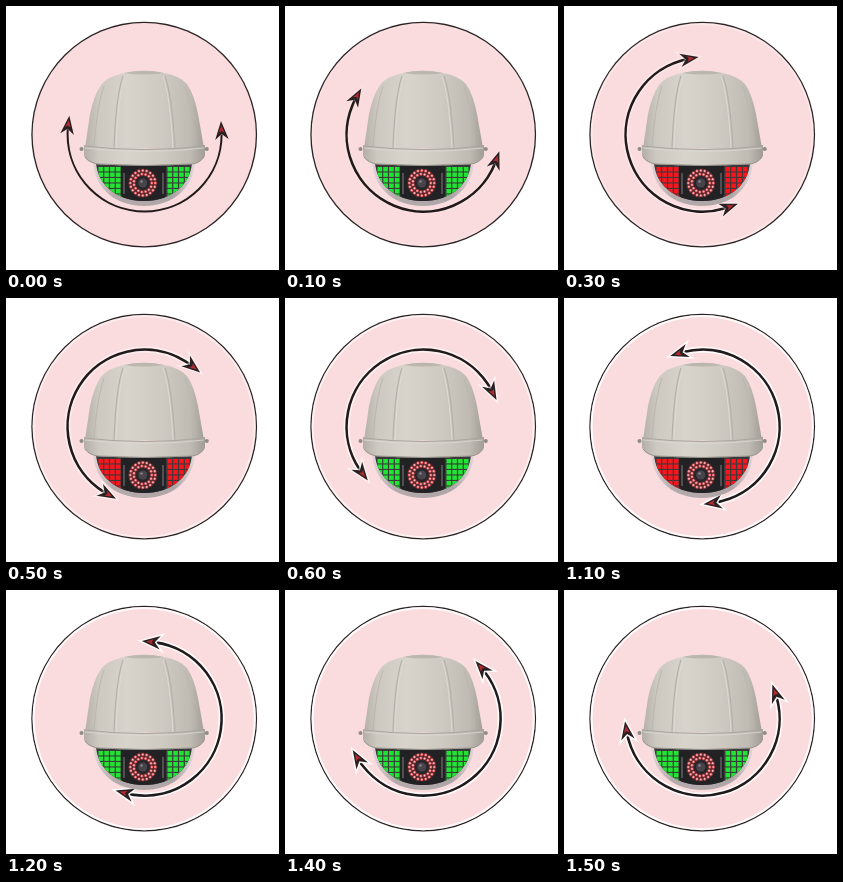
Animation of 273x264 px, one loop 1600 ms. Source, as an HTML page with a canvas:

```html
<!DOCTYPE html>
<html>
<head>
<meta charset="utf-8">
<style>
html, body { margin: 0; width: 100%; height: 100%; overflow: hidden; background: #fff; }
canvas { display: block; width: 273px; height: 264px; }
</style>
</head>
<body>
<canvas></canvas>
<script>
const canvas = document.querySelector('canvas');
const ratio = window.devicePixelRatio || 1;
canvas.width = 273 * ratio;
canvas.height = 264 * ratio;
const ctx = canvas.getContext('2d');
ctx.scale(ratio, ratio);

const STEP = 100, STEPS = 16;
const CX = 138.6, CY = 128.6, RADIUS = 77;
const RAD = Math.PI / 180;
// Rotation in degrees at a few steps; the turn is even between them.
const TURN = [[0, 0], [1, 22.5], [3, 73], [6, 146], [9, 210], [12, 278], [15, 344]];

function turnAt(step) {
  const i = Math.max(1, TURN.findIndex(([s]) => s >= step));
  const [s0, a0] = TURN[i - 1], [s1, a1] = TURN[i];
  return a0 + (a1 - a0) * (step - s0) / (s1 - s0);
}

function disc(x, y, r, fill) {
  ctx.beginPath();
  ctx.arc(x, y, r, 0, 2 * Math.PI);
  ctx.fillStyle = fill;
  ctx.fill();
}

function shape(path, fill, stroke, width = 1) {
  const p = new Path2D(path);
  if (fill) { ctx.fillStyle = fill; ctx.fill(p); }
  if (stroke) { ctx.strokeStyle = stroke; ctx.lineWidth = width; ctx.stroke(p); }
}

function gradient(x0, y0, x1, y1, ...stops) {
  const g = ctx.createLinearGradient(x0, y0, x1, y1);
  stops.forEach(([at, color]) => g.addColorStop(at, color));
  return g;
}

function arrowHead(degrees, direction, halo) {
  ctx.save();
  ctx.rotate(degrees * RAD);
  ctx.translate(RADIUS, 0);
  ctx.scale(1, direction);
  const head = 'M0 9.5 L-6.8 -9 L0 -3.5 L6.8 -9 Z';
  shape(head, null, halo, 3);
  shape(head, '#2a2022');
  shape('M0 5 L-2.8 -2 L0 -0.5 L2.8 -2 Z', '#b02a30');
  ctx.restore();
}

// The light fringe around dark lines grows stronger through the loop.
function backdrop(step) {
  const halo = `rgba(255,255,255,${0.9 * Math.min(1, step / 9)})`;
  disc(CX - 0.4, CY, 112.9, '#2b2425');
  disc(CX - 0.4, CY, 111.6, '#fbdcde');
  ctx.beginPath();
  ctx.arc(CX - 0.4, CY, 110.6, 0, 2 * Math.PI);
  ctx.strokeStyle = halo;
  ctx.lineWidth = 2;
  ctx.stroke();

  ctx.save();
  ctx.translate(CX, CY);
  ctx.rotate((92 + turnAt(step)) * RAD);
  ctx.beginPath();
  ctx.arc(0, 0, RADIUS, -92 * RAD, 92 * RAD);
  ctx.strokeStyle = halo;
  ctx.lineWidth = 6;
  ctx.stroke();
  ctx.strokeStyle = '#211a1b';
  ctx.lineWidth = step ? 2.6 : 2;
  ctx.stroke();
  arrowHead(95, 1, halo);
  arrowHead(-95, -1, halo);
  ctx.restore();
}

function cells(left, color) {
  ctx.fillStyle = color;
  for (let row = 0; row < 6; row++) {
    for (let col = 0; col < 4; col++) {
      ctx.fillRect(left + col * 5.8, 161 + row * 5.5, 4.6, 4.4);
    }
  }
}

function dome(red) {
  const glass = gradient(88, 0, 188, 0, [0, '#e0d3d5'], [0.2, '#b5abad'], [0.8, '#aea5a7'], [1, '#e0d4d6']);
  shape('M87 156 C89 184 111 200 138 200 C165 200 187 184 189 156 Z', glass);
  ctx.save();
  ctx.clip(new Path2D('M90 156 C91 178 110 195 138 195 C166 195 185 178 186 156 Z'));
  ctx.fillStyle = '#3b393b';
  ctx.fillRect(88, 156, 100, 40);
  cells(92.5, red ? '#f8161c' : '#20e532');
  cells(161.5, red ? '#f8161c' : '#20e532');
  shape('M115 158 H160 V189 Q158 196 150 196 H126 Q117 196 115 188 Z', '#222124');
  ctx.fillStyle = '#505054';
  ctx.fillRect(117, 167, 2, 21);
  ctx.fillRect(156, 167, 2, 21);
  ctx.restore();

  disc(136.8, 177, 14.5, '#49292c');
  for (const [count, r] of [[20, 12.5], [15, 9]]) {
    for (let i = 0; i < count; i++) {
      const a = i * 2 * Math.PI / count;
      const x = 136.8 + r * Math.cos(a), y = 177 + r * Math.sin(a);
      disc(x, y, 1.5, '#e5545b');
      disc(x, y, 0.8, '#ffc4c4');
    }
  }
  disc(136.8, 177, 7, '#29262a');
  disc(136.8, 177, 4.6, '#47444a');
  disc(135.5, 175.5, 1.3, '#858087');
}

function housing() {
  disc(75.5, 143, 2, '#8e8b84');
  disc(200.8, 143, 2, '#8e8b84');
  const shell = gradient(78, 0, 199, 0,
    [0, '#b3afa7'], [0.12, '#cdc9c1'], [0.36, '#d8d4cc'], [0.65, '#ceCAC2'], [0.88, '#bfbbb3'], [1, '#a19d95']);
  shape('M118 67 Q138 62.5 158 67 Q174 70 181 78 Q188 88 192 108 L198 142 H79 L84 108 Q88 89 95 79 Q102 70 118 67 Z', shell);
  shape('M118 67 Q138 62.5 158 67 Q138 70 118 67 Z', '#bbb7ae');
  shape('M117 70 Q110 90 108 142 M159 70 Q166 90 169 142', null, '#b5b1a9', 1.2);
  shape('M119 70 Q112 90 110 142 M157 70 Q164 90 167 142', null, '#dfdbd4', 1);
  shape('M98 80 Q91 100 88 140 M179 80 Q186 100 190 140', null, '#bbb7ae', 1);
  shape('M78 139 Q138 146 199 139 V150 Q195 156 188 158 Q138 161 89 158 Q81 156 78 150 Z', shell);
  shape('M78 140 Q138 147 199 140', null, '#aaa69e', 1);
  shape('M79 142 Q138 149 198 142', null, '#dedad3', 0.8);
  shape('M79 151 Q84 157 92 158 Q138 161 186 158 Q194 157 198 151', null, '#9a978f', 1);
}

function draw(now) {
  const step = Math.floor(now / STEP) % STEPS;
  const red = step < 12 && Math.floor(step / 3) % 2 === 1;
  ctx.fillStyle = '#fff';
  ctx.fillRect(0, 0, 273, 264);
  backdrop(step);
  dome(red);
  housing();
}

const start = performance.now();
function frame() {
  draw(performance.now() - start);
  requestAnimationFrame(frame);
}
frame();
</script>
</body>
</html>
```
